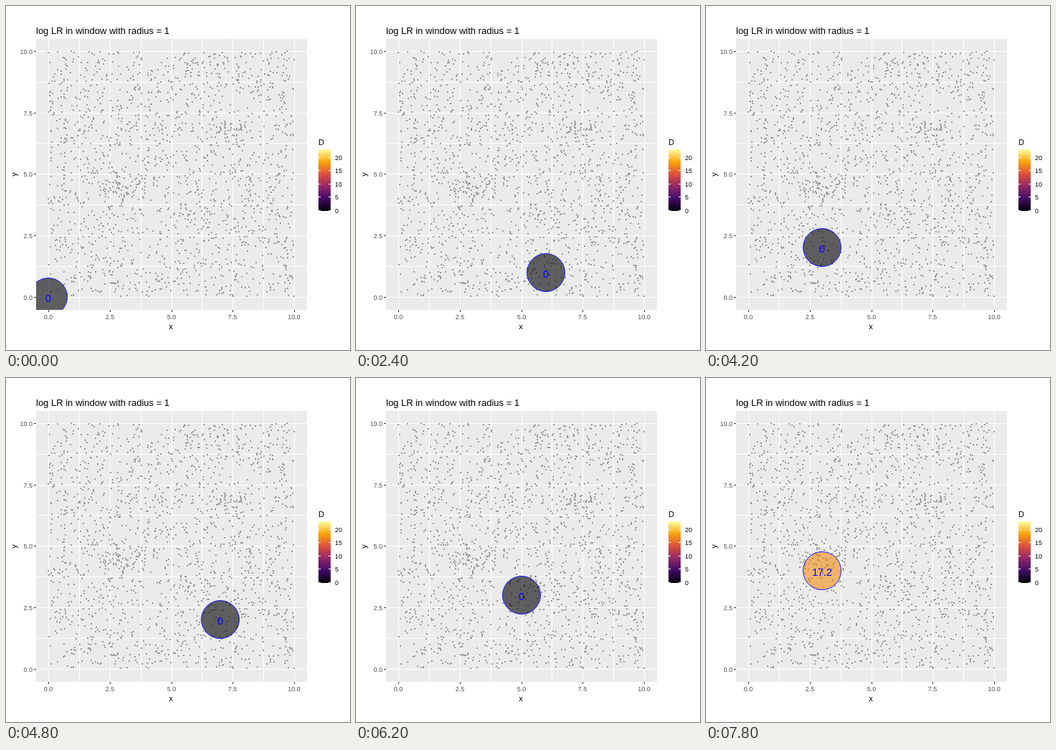
Recreate the animation shown at these times as an HTML page with a canvas. Size 480 by 480 pixels, loop 8 s.

```html
<!DOCTYPE html>
<html lang="en">
<head>
<meta charset="utf-8">
<title>Scan window</title>
<style>
  html, body { margin: 0; width: 100%; height: 100%; overflow: hidden; background: #fff; }
  canvas { display: block; }
</style>
</head>
<body>
<canvas id="stage" width="480" height="480"></canvas>
<script>
const SIZE = 480;
const STEP_MS = 200;
const STEPS = 40;
const PANEL = { x: 42, y: 46, size: 378 };
const MAX_D = 23.1;
const INFERNO = ['#000004', '#420a68', '#932667', '#dd513a', '#fca50a', '#fcffa4'];
const SCORES = { '2,4': 1.3, '3,4': 17.2 };

const px = x => Math.round(59 + 34.3 * x);
const py = y => Math.floor(406.3 - 34.3 * y);

function text(c, label, x, y, size, color = '#000', align = 'left') {
  c.font = `${size}px "Liberation Sans", Arial, sans-serif`;
  c.fillStyle = color;
  c.textAlign = align;
  c.fillText(label, x, y);
}

function rect(c, color, x, y, w, h) {
  c.fillStyle = color;
  c.fillRect(x, y, w, h);
}

function disc(c, x, y, radius) {
  c.beginPath();
  c.arc(x, y, radius, 0, 2 * Math.PI);
}

function inferno(t) {
  const pos = t * (INFERNO.length - 1);
  const i = Math.min(Math.floor(pos), INFERNO.length - 2);
  const channel = (hex, k) => parseInt(hex.slice(1 + 2 * k, 3 + 2 * k), 16);
  const mix = [0, 1, 2].map(k => {
    const a = channel(INFERNO[i], k), b = channel(INFERNO[i + 1], k);
    return Math.round(a + (b - a) * (pos - i));
  });
  return `rgb(${mix})`;
}

function seededRandom(seed) {
  return () => {
    seed = (seed + 0x6d2b79f5) | 0;
    let t = Math.imul(seed ^ (seed >>> 15), 1 | seed);
    t = (t + Math.imul(t ^ (t >>> 7), 61 | t)) ^ t;
    return ((t ^ (t >>> 14)) >>> 0) / 2 ** 32;
  };
}

function drawGrid(c) {
  rect(c, '#ebebeb', PANEL.x, PANEL.y, PANEL.size, PANEL.size);
  for (let v = 0; v <= 10; v += 1.25) {
    const x = px(v), y = py(v);
    rect(c, '#fff', x, PANEL.y, 1, PANEL.size);
    rect(c, '#fff', PANEL.x, y, PANEL.size, 1);
    if (v % 2.5) continue;
    const label = v.toFixed(1);
    rect(c, '#333', x, 424, 1, 3);
    rect(c, '#333', 39, y, 3, 1);
    text(c, label, x, 437, 9, '#4d4d4d', 'center');
    text(c, label, 37, y + 4, 9, '#4d4d4d', 'right');
  }
}

function drawPoints(c) {
  const random = seededRandom(2718);
  const dot = (x, y) => rect(c, '#999', px(x) - 1, py(y) - 1, 2, 2);
  const cluster = (count, x, y, rx, ry) => {
    for (let i = 0; i < count; i++) {
      const angle = 2 * Math.PI * random(), r = Math.sqrt(random());
      dot(x + rx * r * Math.cos(angle), y + ry * r * Math.sin(angle));
    }
  };
  for (let i = 0; i < 1700; i++) dot(10 * random(), 10 * random());
  cluster(50, 3.05, 4.5, 1, 0.6);
  cluster(28, 7.4, 6.8, 0.5, 0.5);
}

function drawLegend(c) {
  const bar = c.createLinearGradient(0, 286, 0, 200);
  INFERNO.forEach((color, i) => bar.addColorStop(i / (INFERNO.length - 1), color));
  text(c, 'D', 436, 194, 11);
  rect(c, bar, 436, 200, 17, 86);
  for (let v = 0; v <= 20; v += 5) {
    const y = Math.floor(285.2 - 3.7 * v);
    rect(c, '#fff', 436, y, 3, 1);
    rect(c, '#fff', 450, y, 3, 1);
    text(c, v, 459, y + 4, 9);
  }
}

function drawBackground() {
  const layer = document.createElement('canvas');
  layer.width = layer.height = SIZE;
  const c = layer.getContext('2d');
  rect(c, '#fff', 0, 0, SIZE, SIZE);
  drawGrid(c);
  drawPoints(c);
  drawLegend(c);
  text(c, 'log LR in window with radius = 1', 42, 39, 13);
  text(c, 'x', 230, 451, 11, '#000', 'center');
  c.save();
  c.translate(15, 235);
  c.rotate(-Math.PI / 2);
  text(c, 'y', 0, 0, 11, '#000', 'center');
  c.restore();
  return layer;
}

// The window sweeps an 11 by 11 lattice in alternating directions;
// 121 positions are sampled by 100 evenly spaced steps.
function windowAt(step) {
  const index = Math.round(step * 120 / 99);
  const row = Math.floor(index / 11), col = index % 11;
  return { x: row % 2 ? 10 - col : col, y: row };
}

function drawWindow(c, { x, y }) {
  const score = SCORES[`${x},${y}`] || 0;
  const cx = px(x), cy = py(y);
  c.save();
  c.beginPath();
  c.rect(PANEL.x, PANEL.y, PANEL.size, PANEL.size);
  c.clip();

  c.globalAlpha = 0.6;
  c.fillStyle = inferno(score / MAX_D);
  disc(c, cx, cy, 26.4);
  c.fill();

  c.globalAlpha = 1;
  c.strokeStyle = '#00f';
  c.lineWidth = 0.9;
  disc(c, cx, cy, 26.5);
  c.stroke();

  text(c, score, cx, cy + 7, 14.2, '#00f', 'center');
  c.restore();
}

const ctx = document.getElementById('stage').getContext('2d');
const background = drawBackground();
const start = performance.now();

function render() {
  const elapsed = Math.max(0, performance.now() - start);
  const step = Math.floor(elapsed / STEP_MS) % STEPS;
  ctx.drawImage(background, 0, 0);
  drawWindow(ctx, windowAt(step));
  requestAnimationFrame(render);
}
render();
</script>
</body>
</html>
```
